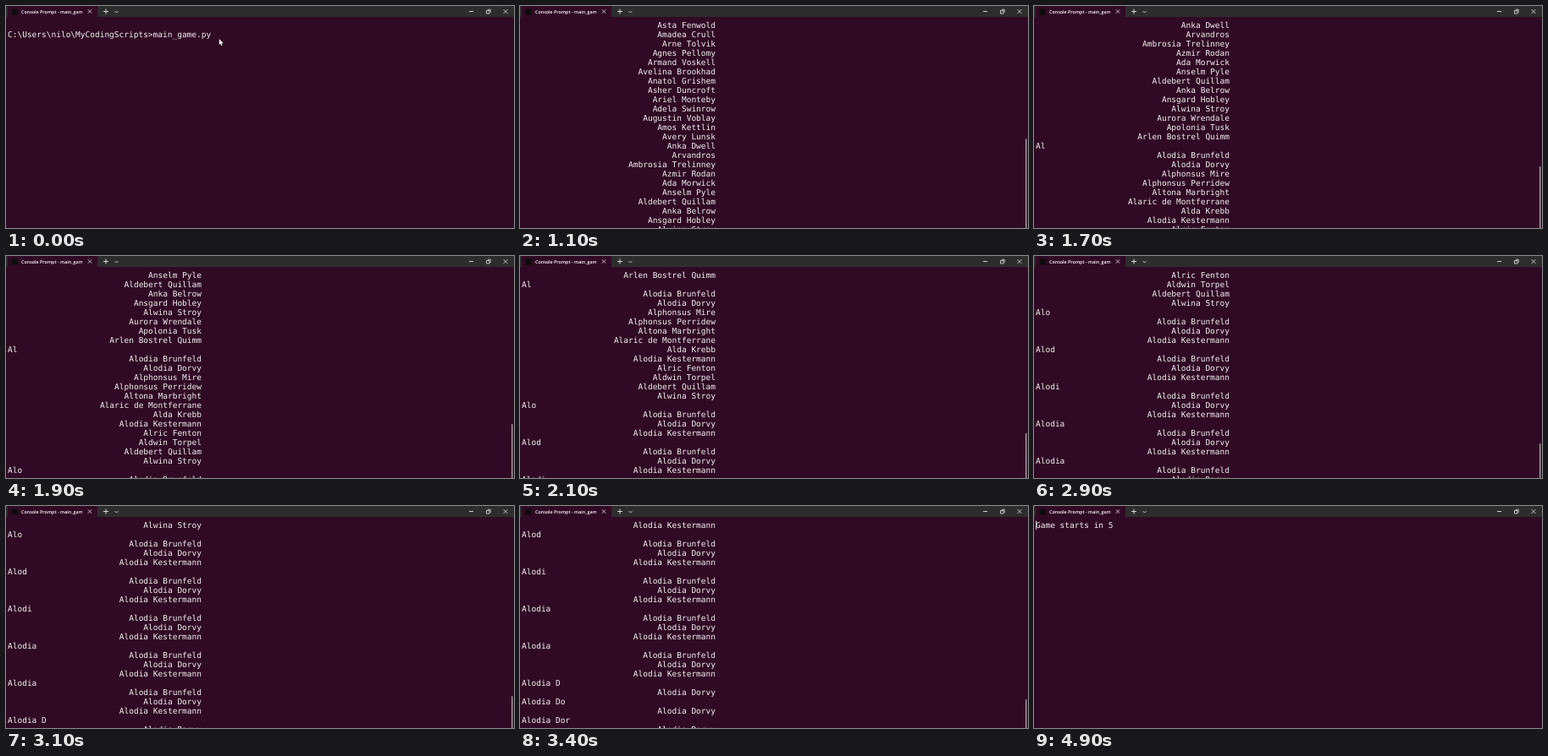
An HTML page with a canvas that plays this animation: 600x263 px, repeating every 5 s.

```html
<!DOCTYPE html>
<html lang="en">
<head>
<meta charset="utf-8">
<title>Terminal guessing game</title>
<style>
  html, body { margin: 0; width: 100%; height: 100%; overflow: hidden; background: #300a24; }
  canvas { display: block; width: 600px; height: 263px; }
</style>
</head>
<body>
<canvas id="stage"></canvas>
<script>
const W = 600, H = 263, LOOP = 5000;
const LEFT = 2, RIGHT = 231, ROW = 11, BAR = 13;
const BG = '#300a24', CHROME = '#2d2d2d', INK = '#f2f2f2';
const MONO = '9.51px "DejaVu Sans Mono", monospace';
const UI = '600 5.4px "Open Sans", sans-serif';

const canvas = document.getElementById('stage');
const dpr = window.devicePixelRatio || 1;
canvas.width = W * dpr;
canvas.height = H * dpr;
const ctx = canvas.getContext('2d');
ctx.scale(dpr, dpr);
ctx.textRendering = 'geometricPrecision';

// Matches for "A", as far as they are ever visible
const early = [
  'Asta Fenwold', 'Amadea Crull', 'Arne Tolvik', 'Agnes Pellomy', 'Armand Voskell',
  'Avelina Brookhad', 'Anatol Grishem', 'Asher Duncroft', 'Ariel Monteby',
  'Adela Swinrow', 'Augustin Voblay', 'Amos Kettlin', 'Avery Lunsk',
  'Anka Dwell', 'Arvandros', 'Ambrosia Trelinney', 'Azmir Rodan', 'Ada Morwick',
  'Anselm Pyle', 'Aldebert Quillam', 'Anka Belrow', 'Ansgard Hobley', 'Alwina Stroy',
  'Aurora Wrendale', 'Apolonia Tusk', 'Arlen Bostrel Quimm'
];
const authors = [
  'Alodia Brunfeld', 'Alodia Dorvy', 'Alphonsus Mire', 'Alphonsus Perridew',
  'Altona Marbright', 'Alaric de Montferrane', 'Alda Krebb', 'Alodia Kestermann',
  'Alric Fenton', 'Aldwin Torpel', 'Aldebert Quillam', 'Alwina Stroy'
];
const answer = 'Alodia Dorvy';

// Each keystroke echoes the query, then lists its matches
const match = name => ({ text: name, right: true });
const rows = early.map(match);
for (let n = 2; n <= answer.length; n++) {
  const query = answer.slice(0, n);
  rows.push({ text: query }, ...authors.filter(a => a.startsWith(query)).map(match));
}

// [time, first visible row]
const scroll = [
  [1100, 0], [1700, 13], [1800, 17], [1900, 18], [2000, 21], [2100, 25],
  [2300, 29], [2400, 33], [2900, 35], [3000, 37], [3100, 38],
  [3200, 39], [3300, 41], [3400, 42]
];

function rect(x, y, w, h, color) {
  ctx.fillStyle = color;
  ctx.fillRect(x, y, w, h);
}

function lines(color, width, ...paths) {
  ctx.strokeStyle = color;
  ctx.lineWidth = width;
  ctx.beginPath();
  for (const [x, y, ...rest] of paths) {
    ctx.moveTo(x, y);
    for (let i = 0; i < rest.length; i += 2) ctx.lineTo(rest[i], rest[i + 1]);
  }
  ctx.stroke();
}

function cross(x, y, r) {
  lines('#e6e6e6', 0.8, [x - r, y - r, x + r, y + r], [x - r, y + r, x + r, y - r]);
}

function print(text, row, right) {
  ctx.font = MONO;
  ctx.fillStyle = INK;
  ctx.textAlign = right ? 'right' : 'left';
  ctx.fillText(text, right ? RIGHT : LEFT, 26.3 + row * ROW);
}

function titleBar() {
  rect(0, 0, W, BAR, CHROME);
  rect(2, 0, 106, BAR, BG);
  rect(6.5, 3.5, 7, 7, '#0c0c0c');

  ctx.save();
  ctx.beginPath();
  ctx.rect(18, 0, 72.5, BAR);
  ctx.clip();
  ctx.font = UI;
  ctx.fillStyle = '#fff';
  ctx.textAlign = 'left';
  ctx.fillText('Console Prompt - main_game.py', 18, 8.8);
  ctx.restore();

  cross(99, 6.5, 2.2);
  lines('#e6e6e6', 0.9, [115, 6.5, 121, 6.5], [118, 3.5, 118, 9.5]);
  lines('#e6e6e6', 0.8, [128.5, 6, 130.5, 8, 132.5, 6]);
  lines('#e6e6e6', 0.9, [547, 6.5, 552, 6.5]);
  lines('#e6e6e6', 0.8, [567.5, 5.5, 571, 5.5, 571, 9, 567.5, 9, 567.5, 5.1],
    [568.8, 4.2, 572.2, 4.2, 572.2, 7.8]);
  cross(590, 6.5, 2.4);
}

function pointer(x, y) {
  ctx.beginPath();
  ctx.moveTo(x, y);
  for (const [dx, dy] of [[0, 7], [1.6, 5.6], [2.7, 8], [3.8, 7.5], [2.8, 5.2], [4.8, 5.1]]) {
    ctx.lineTo(x + dx, y + dy);
  }
  ctx.closePath();
  ctx.strokeStyle = '#111';
  ctx.lineWidth = 0.9;
  ctx.stroke();
  ctx.fillStyle = '#fff';
  ctx.fill();
}

function launch(t) {
  print('C:\\Users\\nilo\\MyCodingScripts>main_game.py', 1);
  if (t >= 500) print('Type the name of the quote author:', 3);
  pointer(251.8, 39);
}

function results(t) {
  const top = scroll.filter(s => s[0] <= t).pop()[1];
  rows.slice(top, top + 23).forEach((r, i) => print(r.text, i, r.right));
  const above = top + 23;
  const thumb = 20 + 293 * above / (above + 26);
  rect(597, thumb, 1.5, H - thumb, '#a79ca4');
}

function countdown() {
  print('Game starts in 5', 0);
  rect(2, 17.5, 0.8, 10.5, INK);
}

function draw(t) {
  rect(0, 0, W, H, BG);
  if (t < 1100) launch(t);
  else if (t < 4900) results(t);
  else countdown();
  titleBar();
}

const start = performance.now();
function tick() {
  draw((performance.now() - start) % LOOP);
  requestAnimationFrame(tick);
}
tick();
</script>
</body>
</html>
```
